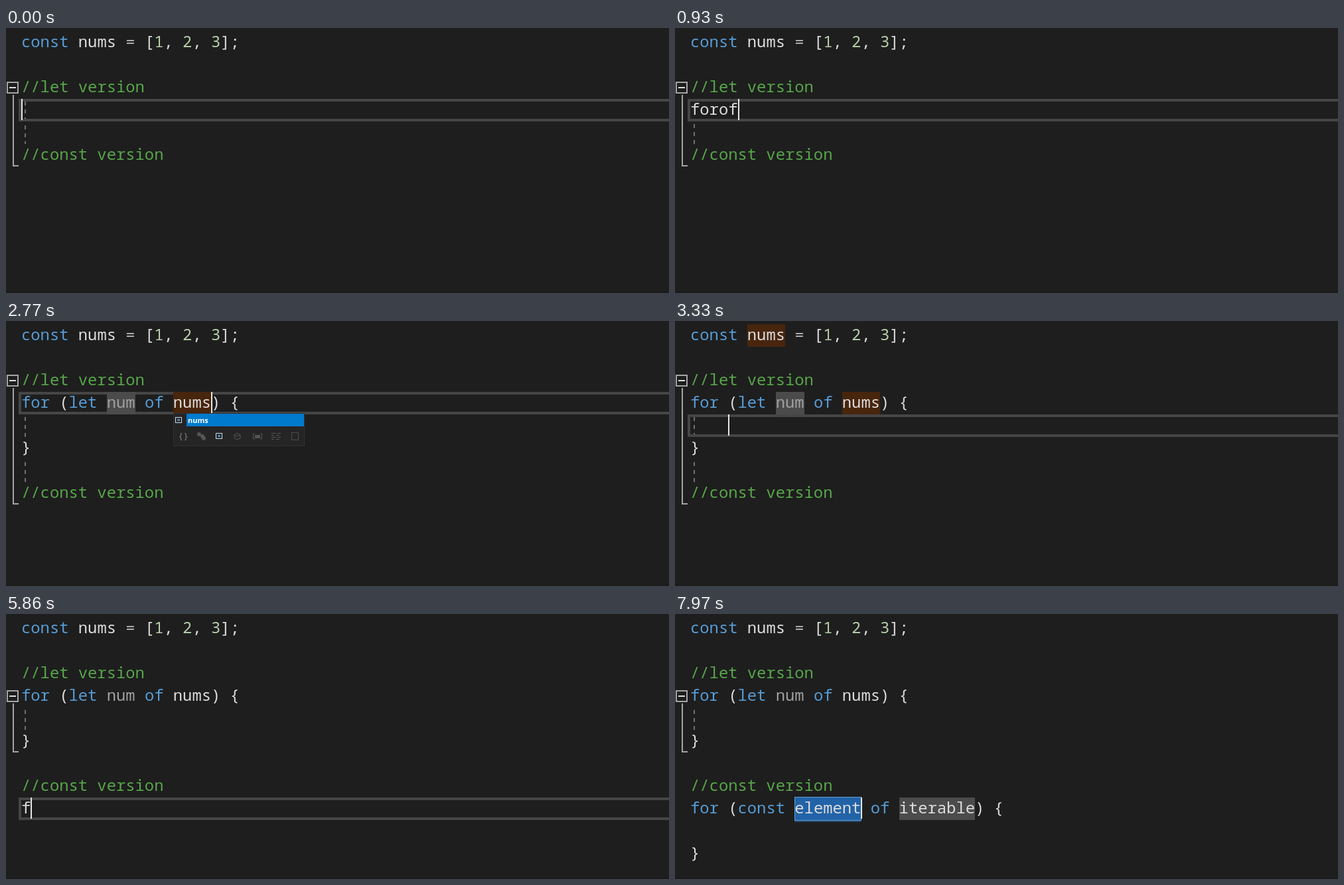
Animation, 999 px wide and 400 px high, one loop 8 s. Source, as an HTML page with a canvas:

```html
<!DOCTYPE html>
<html lang="en">
<head>
<meta charset="utf-8">
<title>Code snippets</title>
<style>
  html, body { margin: 0; width: 100%; height: 100%; overflow: hidden; background: #1e1e1e; }
  canvas { display: block; }
</style>
</head>
<body>
<canvas id="stage" width="999" height="400"></canvas>
<script>
const ctx = document.getElementById('stage').getContext('2d');
const LOOP = 8000, LEFT = 23, CHAR = 14.3, ROW = 34;
const CODE_FONT = '23.83px "Noto Sans Mono", monospace';
const x = col => LEFT + col * CHAR;
const y = row => 5 + row * ROW;

const field = (row, col, len) => ({ row, col, len, kind: 'field' });
const pick = (row, col, len) => ({ row, col, len, kind: 'pick' });
const glow = (row, col, len) => ({ row, col, len, kind: 'glow' });
const bright = (row, col, len) => ({ row, col, len, kind: 'bright' });

const words = {
  f: 'false fetch finally find focus for for foreach forin',
  fo: 'focus FontFace for for foreach forin forof forofc FormData',
  for: 'for for foreach forin forof forofc FormData forr HTMLFormElement',
  foro: 'forof forofc SVGForeignObjectElement',
  forof: 'forof forofc',
  forofc: 'forofc',
  nu: 'null Number nums Enumerator menubar onunload SVGNumber SVGNumberList',
  num: 'Number nums SVGNumber',
  nums: 'nums'
};
const popup = (row, col, typed, pos = 0, extra) =>
  ({ row, col, typed, pos, items: words[typed].split(' '), wide: typed.startsWith('foro'), ...extra });

const loop = (name, list) => `for (let ${name} of ${list}) {`;
const shortcut = (key, typed, pos) => ({
  [key]: typed, col: typed.length, pop: popup(key === 'top' ? 3 : 8, 0, typed, pos)
});
const typeList = (typed, pos) => ({
  top: loop('num', typed), col: 16 + typed.length, box: true, dim: true,
  marks: [field(3, 9, 3), (typed === 'nums' ? glow : field)(3, 16, typed.length)],
  pop: words[typed] && popup(3, 16, typed, pos)
});
const found = [field(3, 9, 3), glow(3, 16, 4), glow(0, 6, 4)];

// Each step keeps the earlier state, apart from marks and popup.
const steps = [
  [0, { top: '', low: '', open: false, closed: false, fold: 2, row: 3, col: 0, box: true, caret: true, dim: false }],
  [120, { top: 'f', col: 1 }],
  [240, shortcut('top', 'f', 5)],
  [360, shortcut('top', 'fo', 2)],
  [510, shortcut('top', 'for')],
  [630, shortcut('top', 'foro')],
  [780, shortcut('top', 'forof')],
  [930, {}],
  [1210, { top: loop('element', 'iterable'), open: true, box: false, col: 16, marks: [field(3, 20, 8), pick(3, 9, 7)] }],
  [1490, { top: loop('nu', 'iterable'), box: true, col: 11, marks: [field(3, 9, 2), field(3, 15, 8)] }],
  [1740, { top: loop('num', 'iterable'), col: 12, marks: [field(3, 9, 3), field(3, 16, 8)] }],
  [2010, { box: false, col: 24, marks: [field(3, 9, 3), pick(3, 16, 8)] }],
  [2410, typeList('n')],
  [2530, typeList('nu', 2)],
  [2650, typeList('num', 1)],
  [2770, typeList('nums')],
  [3080, { marks: found }],
  [3330, { row: 4, col: 4, marks: found }],
  [3640, {}],
  [3920, { caret: false }],
  [4320, { caret: true }],
  [4440, { fold: 3 }],
  [4900, { row: 8, col: 0 }],
  [5430, { caret: false }],
  [5860, { low: 'f', col: 1, caret: true }],
  [5980, shortcut('low', 'f', 5)],
  [6130, shortcut('low', 'fo', 2)],
  [6280, shortcut('low', 'foro')],
  [6430, shortcut('low', 'forof')],
  [6710, { low: 'forofc', col: 6, pop: popup(8, 0, 'forofc') }],
  [7140, { pop: popup(8, 0, 'forofc', 0, { tip: 'for...of with const' }) }],
  [7260, {}],
  [7660, { low: 'for (const element of iterable) {', closed: true, box: false, col: 18, marks: [field(8, 22, 8), pick(8, 11, 7)] }],
  [7970, { marks: [field(8, 22, 8), bright(8, 11, 7)] }]
];

function stateAt(t) {
  let s = {};
  for (const [time, change] of steps)
    if (time <= t) s = { ...s, marks: [], pop: null, ...change };
  return s;
}

function rect(color, l, t, w, h) {
  ctx.fillStyle = color;
  ctx.fillRect(l, t, w, h);
}

function frame(color, l, t, w, h, line = 1) {
  ctx.strokeStyle = color;
  ctx.lineWidth = line;
  ctx.strokeRect(l + line / 2, t + line / 2, w - line, h - line);
}

function path(color, points, line = 1) {
  ctx.strokeStyle = color;
  ctx.lineWidth = line;
  ctx.beginPath();
  points.forEach(p => ctx.lineTo(...p));
  ctx.stroke();
}

function write(text, l, base, color, font) {
  ctx.font = font;
  ctx.fillStyle = color;
  ctx.fillText(text, l, base);
}

function tokenColor(token, dim) {
  if (token.startsWith('//')) return '#57a64a';
  if (/^(const|let|for|of)$/.test(token)) return '#569cd6';
  if (/^\d/.test(token)) return '#b5cea8';
  if (token === '=') return '#b4b4b4';
  return dim && token === 'num' ? '#a0a0a0' : '#dcdcdc';
}

function drawCode(text, row, dim) {
  for (const m of text.matchAll(/\/\/.*|\w+|[^\s\w]/g))
    write(m[0], x(m.index), y(row) + 24, tokenColor(m[0], dim), CODE_FONT);
}

function drawGuide(from, to) {
  for (let d = from + 4; d < to; d += 12) rect('#707070', 28, d, 2, Math.min(6, to - d));
}

function drawMargin(s) {
  const top = y(s.fold) + 8, end = s.open && s.fold === 2 ? 277 : 209;
  frame('#a5a5a5', 1, top, 18, 18, 2);
  rect('#dcdcdc', 5, top + 8, 10, 2);
  rect('#a5a5a5', 10, top + 20, 2, end - top - 20);
  rect('#a5a5a5', 10, end - 2, 9, 2);
  drawGuide(s.top ? 141 : 107, 175);
  if (s.open && s.fold === 2) drawGuide(209, 243);
}

function drawMark({ row, col, len, kind }) {
  const l = Math.round(x(col)), t = y(row), w = Math.round(len * CHAR);
  if (kind === 'field') rect('#4b4b4b', l, t, w, ROW);
  if (kind === 'glow') rect('#48250d', l, t, w, ROW);
  if (kind === 'pick') rect('#38506f', l, t - 1, w, ROW + 4);
  if (kind === 'bright') {
    rect('#28476b', l, t + 34, w, 3);
    rect('#2263a8', l, t - 1, w, 36);
    frame('#5f9fd8', l, t - 1, w + 1, 36);
  }
}

function itemIcon(l, t) {
  frame('#c8dcec', l, t, 10, 9);
  rect('#75bdf0', l + 3, t + 3, 4, 1);
  rect('#75bdf0', l + 3, t + 5, 4, 1);
}

function drawFilters(l, t) {
  const gray = '#555558';
  write('{ }', l + 9, t + 4, '#686868', 'bold 12px "Open Sans", sans-serif');
  ctx.fillStyle = gray;
  for (const [dx, dy] of [[39, -3], [44, 0], [46, 3]]) {
    ctx.beginPath();
    ctx.arc(l + dx, t + dy, 3, 0, 7);
    ctx.fill();
  }
  itemIcon(l + 64, t - 5);
  path(gray, [[l + 92, t - 2], [l + 96, t - 5], [l + 101, t - 2], [l + 101, t + 3], [l + 96, t + 5],
    [l + 92, t + 3], [l + 92, t - 2], [l + 96, t], [l + 101, t - 2]]);
  path(gray, [[l + 123, t - 4], [l + 120.5, t - 4], [l + 120.5, t + 4], [l + 123, t + 4]]);
  path(gray, [[l + 131, t - 4], [l + 133.5, t - 4], [l + 133.5, t + 4], [l + 131, t + 4]]);
  rect(gray, l + 123, t - 2, 8, 5);
  for (let i = 0; i < 4; i++) {
    rect(gray, l + 148, t - 5 + i * 3, 7 - i % 2 * 3, 1);
    rect(gray, l + 157 - i % 2 * 2, t - 5 + i * 3, 5, 1);
  }
  ctx.setLineDash([2, 1]);
  frame('#626266', l + 178, t - 6, 11, 12);
  ctx.setLineDash([]);
}

function drawPopup(p) {
  const l = Math.round(x(p.col)), t = y(p.row + 1) - 2;
  const w = p.wide ? 219 : 198, h = p.items.length * 19 + 31;
  const scroll = p.items.length > 8 ? 17 : 0;
  rect('#252526', l, t, w, h);
  p.items.forEach((item, i) => {
    const top = t + 1 + i * 19;
    if (i === p.pos) rect('#007acc', l + 20, top, w - 21 - scroll, 19);
    itemIcon(l + 3, top + 5);
    const n = item.toLowerCase().startsWith(p.typed) ? p.typed.length : 0;
    const font = '11px "Open Sans", sans-serif', bold = 'bold ' + font;
    write(item.slice(0, n), l + 22, top + 14, '#ffffff', bold);
    const dx = ctx.measureText(item.slice(0, n)).width;
    write(item.slice(n), l + 22 + dx, top + 14, '#f1f1f1', font);
  });
  if (scroll) {
    rect('#3e3e42', l + w - 18, t + 1, 17, h - 31);
    rect('#686868', l + w - 14, t + 60, 9, 30);
  }
  drawFilters(l, t + h - 15);
  frame('#323234', l, t, w, h);
  if (p.tip) {
    rect('#252526', l + w + 2, t, 122, 23);
    frame('#46464a', l + w + 2, t, 122, 23);
    write(p.tip, l + w + 8, t + 16, '#f1f1f1', '11px "Open Sans", sans-serif');
  }
}

function draw(t) {
  const s = stateAt(t);
  rect('#1e1e1e', 0, 0, 999, 400);
  rect('#1b1b1b', 0, 398, 999, 2);
  drawMargin(s);
  if (s.box) frame('#464646', 19, y(s.row), 990, ROW, 4);
  s.marks.forEach(drawMark);
  const lines = ['const nums = [1, 2, 3];', '', '//let version', s.top, '',
    ...(s.open ? ['}', ''] : []), '//const version', s.low, '', s.closed ? '}' : ''];
  lines.forEach((text, row) => drawCode(text, row, s.dim));
  if (s.caret) rect('#e6e6e6', Math.round(x(s.col)), y(s.row), 2, 32);
  if (s.pop) drawPopup(s.pop);
}

const start = performance.now();
function tick() {
  draw((performance.now() - start) % LOOP);
  requestAnimationFrame(tick);
}
tick();
</script>
</body>
</html>
```
